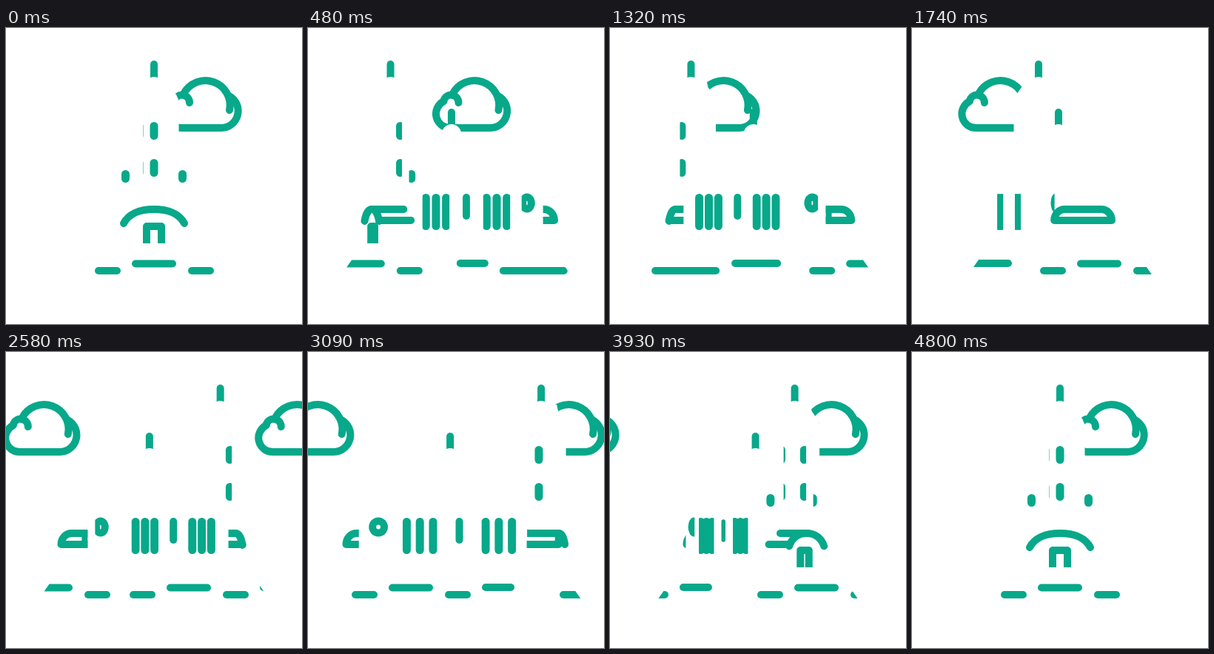
These frames come from a looping animation (400 by 400 pixels, 6.83 s). An HTML page:

```html
<!DOCTYPE html>
<html lang="en">
<head>
<meta charset="utf-8">
<title>Turning church</title>
<style>
html, body { margin: 0; width: 100%; height: 100%; overflow: hidden; background: #fff; }
svg { display: block; width: 100vw; height: 100vh; }
.line { fill: none; stroke: #08a88a; stroke-width: 10; stroke-linecap: round; stroke-linejoin: round; }
.butt { stroke-linecap: butt; }
.mask { fill: #fff; }
</style>
</head>
<body>
<svg viewBox="0 0 400 400"><g id="scene"></g></svg>
<script>
const LOOP = 6830, TURN = 4800, STEP = 30;
const scene = document.getElementById('scene');
const { abs, sin, cos, min, max, PI } = Math;

const times = [0, 900, 1740, 2580, 3090, 3930, 4800];
const travel = spline([0, 230, 425, 618, 726, 867, 946]);
const angle = spline([0, 90, 165.6, 230.3, 279, 334.8, 360]);

// Ground dashes: left end, right end, row
const dashes = [
  [120, 155, 328], [170, 230, 318.5], [246, 281, 328], [327, 370, 318], [385, 477, 328],
  [493, 560, 318], [598, 633, 328], [648, 708, 318.5], [724, 759, 328], [785, 820, 328],
  [835, 895, 318.5], [911, 946, 328], [961, 1005, 318], [1066, 1101, 328],
  [1116, 1176, 318.5], [1192, 1227, 328]
];

// Smooth curve through values placed at the shared times
function spline(v) {
  const n = times.length - 1;
  const rate = i => (v[i + 1] - v[i]) / (times[i + 1] - times[i]);
  const slope = times.map((_, i) =>
    i === 0 ? rate(0) * 1.08 : i === n ? rate(n - 1) * 0.4 : (rate(i - 1) + rate(i)) / 2);
  return t => {
    let i = 0;
    while (i < n - 1 && t > times[i + 1]) i++;
    const h = times[i + 1] - times[i], u = (t - times[i]) / h, w = 1 - u;
    return v[i] * w * w * (1 + 2 * u) + v[i + 1] * u * u * (3 - 2 * u) +
      h * u * w * (slope[i] * w - slope[i + 1] * u);
  };
}

let clipId = 0;
const path = (d, more = '') => `<path class="line" d="${d}" ${more}/>`;
const post = (x, y1, y2, w = 10) => path(`M${x} ${y1}V${y2}`, `style="stroke-width:${w}"`);
function clipTo(shape, content) {
  const id = 'clip' + clipId++;
  return `<clipPath id="${id}"><path d="${shape}"/></clipPath><g clip-path="url(#${id})">${content}</g>`;
}
const clipX = (a, b, content) => b > a ? clipTo(`M${a} 0H${b}V400H${a}Z`, content) : '';
const keepSide = (x, dir, content) => dir > 0 ? clipX(x, 900, content) : clipX(-500, x, content);

function cloud(x) {
  return `<g transform="translate(${x} 0)">` +
    path('M89 92A23 23 0 0 1 78 135H24A19 19 0 0 1 15 99') +
    path('M15 98A10.2 10.2 0 0 1 35 101') +
    path('M27 89A33.2 33.2 0 0 1 89 111') + '</g>';
}

function ground(shift, s) {
  const w = 109 + 60 * abs(s);
  const lines = dashes.map(([a, b, y]) => path(`M${a + 5 - shift} ${y}H${b - 5 - shift}`)).join('');
  return clipTo(`M${200 - w} 333H${200 + w}L${186 + w} 313H${214 - w}Z`, lines);
}

function turret(s) {
  const x = 200 - 8 * abs(s);
  return post(x, 114, 136) + `<circle class="mask" cx="${x}" cy="143" r="13"/>`;
}

function tower(s, c) {
  const x = 200 - 116.5 * s;
  const pair = off => post(x + off, 132.5, 145.5, 11) + post(x + off, 182.5, 195.5, 11);
  const panes = (c > 0 ? pair(-30 * s) : '') + pair((s > 0 ? 20 : -20) * c);
  return post(x, 49, 72) +
    `<circle class="mask" cx="${x}" cy="78" r="12"/>` +
    `<path class="mask" transform="translate(${x} 0)" d="M-10 71H21L23 80L30 90L33.5 98V160H25V215H-25V160H-33.5V98L-30 90L-23 80L-21 71Z"/>` +
    (c > -0.8 ? clipX(x - 15, x + 15.5, panes) : '');
}

function facade(s, c) {
  if (c < 0.6) return '';
  const x = 200 - 107 * s, gap = 38.5 * (1 - 0.6 * abs(s));
  return post(x - gap, 197.5, 203.5, 11) + post(x + gap, 197.5, 203.5, 11);
}

function porch(s, c) {
  const dir = s > 0 ? 1 : -1, a = abs(s);
  const x = 200 - (138 + 18 * max(0, c) + 8 * max(0, -c)) * s;
  const inner = 41 * (1 - a), outer = max(8, inner);
  const foot = 264 - 4 * a, front = c > 0.05;
  const len = 43 * min(1, 1.5 * a);
  const half = (h, d) => `${x + d * h} ${foot}C${x + d * h * 0.85} 252 ${x + d * h * 0.5} 245 ${x} 245`;
  let out = path('M' + half(outer, -dir));
  if (front) out += path('M' + half(inner, dir));
  if (len > 2) {
    const end = a > 0.85 ? 'style="stroke-linecap:butt"' : '';
    const from = front ? x + dir * inner : x - dir * outer;
    const to = front ? from + dir * len : x + dir * len;
    const ridge = min(43, len * 1.3);
    out += path(`M${x} 245H${x + dir * ridge}`, end) + path(`M${from} 260H${to}`, end);
  }
  if (!front) out = keepSide(200 - dir * (97 + 6 * a * a), -dir, out);
  if (c > 0 && a < 0.8) {
    const d = 200 - 148 * s, w = 10 * (1 - a);
    out += `<path class="line butt" d="M${d - w} 291V268H${d + w}V291"/>`;
  }
  return out;
}

function apse(s, c) {
  const dir = s > 0 ? 1 : -1, a = abs(s);
  const x = 200 + (125 + 17 * max(0, c)) * s, h = 22 + 18 * c * c;
  const edge = c > 0 ? 72 + 60 * a : 134 - 170 * abs(c) ** 3;
  const cut = 200 + dir * edge;
  let out = path(`M${x - h} 260A14 15 0 0 1 ${x - h + 14} 245H${x + h - 14}A14 15 0 0 1 ${x + h} 260Z`);
  if (c < -0.3 && c > -0.85) out += post(cut + dir * 3, 245, 260);
  return keepSide(cut, dir, out);
}

function sideWall(s, c) {
  const a = abs(s), k = abs(c);
  if (a < 0.12) return '';
  const dir = s > 0 ? 1 : -1;
  const turn = (c > 0 ? 1 : -1) * dir;
  const mid = 200 - (dir > 0 ? 8 : 5) * s + turn * (c > 0 ? 64 : 75) * k ** 2.7;
  const away = c < -0.8;
  const squeeze = a * (1 + 0.12 * min(0, c));
  let out = away ? '' : post(mid, 229, 254, 10 * min(1, 1.3 * a));

  for (const g of [-54, 54]) {
    const x = mid + g * squeeze, w = 24 * a;
    const bars = [-18, 0, 18].map(d => post(x + d * squeeze, 229.5, 267.5, 11)).join('');
    const lo = away && dir > 0 ? x - 2 : x - w;
    const hi = away && dir < 0 ? x + 2 : x + w;
    out += clipX(lo, hi, bars);
  }

  const r = 200 + 106 * s + turn * (c > 0 ? 56 : 36) * k ** 3;
  const rx = 13 * (0.3 + 0.7 * a);
  const keep = c > 0 ? dir : -dir;
  const ring = `<ellipse cx="${r}" cy="236.5" rx="${rx}" ry="13" fill="#08a88a"/>` +
    `<ellipse class="mask" cx="${r}" cy="236.5" rx="${max(0, rx - 10)}" ry="3"/>`;
  return out + keepSide(r + keep * (16 * c * c - 14), keep, ring);
}

function draw(t) {
  const moved = travel(t), e = moved / 946, th = angle(t) * PI / 180;
  const s = sin(th), c = cos(th);
  clipId = 0;
  const roof = c > 0 ? turret(s) + facade(s, c) + tower(s, c) : tower(s, c) + turret(s);
  scene.innerHTML = cloud(213 - 334 * e) + cloud(213 + 357 * (1 - e)) + roof +
    sideWall(s, c) + apse(s, c) + porch(s, c) + ground(moved, s);
}

const start = performance.now();
let last = -1;
function tick() {
  const now = (performance.now() - start) % LOOP;
  const t = min(TURN, Math.floor(now / STEP) * STEP);
  if (t !== last) draw(last = t);
  requestAnimationFrame(tick);
}
tick();
</script>
</body>
</html>
```
